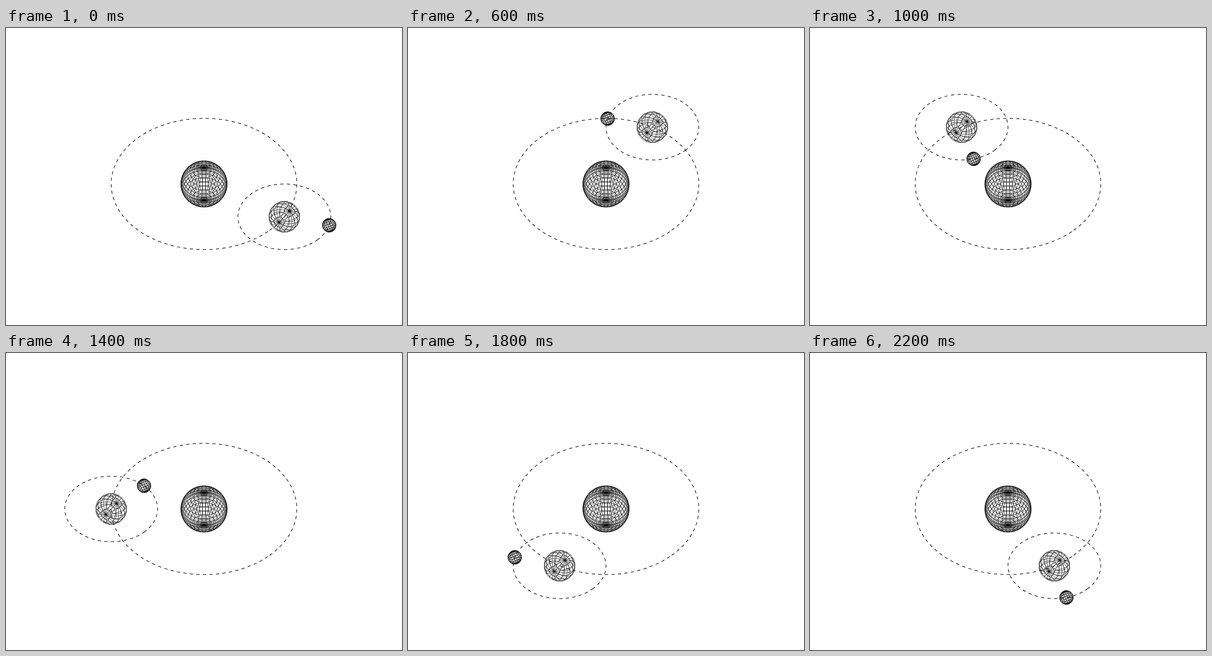
Animation of 864x648 px, one loop 2.3 s. Source, as an HTML page:

```html
<!DOCTYPE html>
<html lang="en">
<head>
<meta charset="utf-8">
<title>Orbits</title>
<style>
  html, body { margin: 0; width: 100%; height: 100%; overflow: hidden; background: #fff; }
  svg { display: block; width: 864px; height: 648px; }
  path { fill: none; stroke: #000; }
  .mesh { stroke-width: .8; }
  .orbit { stroke-width: 1.25; stroke-dasharray: 7.117; }
</style>
</head>
<body>
<svg viewBox="0 0 864 648">
  <g transform="translate(432 340.3)">
    <path id="planetOrbit" class="orbit"/>
    <path id="sun" class="mesh"/>
    <g id="planetSystem">
      <path id="moonOrbit" class="orbit"/>
      <path id="planet" class="mesh"/>
      <path id="moon" class="mesh"/>
    </g>
  </g>
</svg>
<script>
const UNIT = 67.49;
const STEP_MS = 100;
const STEPS = 23;
const PLANET_ORBIT = 3 * UNIT;
const MOON_ORBIT = 1.5 * UNIT;
const H = Math.SQRT1_2;

const rad = deg => deg * Math.PI / 180;
const get = id => document.getElementById(id);

// Orthographic view, 45° above the orbital plane and 45° round the z axis.
const project = ([x, y, z]) => [H * (x + y), (x - y) / 2 - H * z];

const onOrbit = (radius, deg) =>
  project([radius * Math.cos(rad(deg)), radius * Math.sin(rad(deg)), 0]);

function orbitPath(radius) {
  const start = onOrbit(radius, 0), half = onOrbit(radius, 180);
  const arc = end => `A${radius} ${radius * H} 0 0 0 ${end}`;
  return `M${start}${arc(half)}${arc(start)}`;
}

// Wire sphere whose axis leans by `tilt` degrees towards the x axis.
function spherePath(radius, step, tilt) {
  const c = Math.cos(rad(tilt)), s = Math.sin(rad(tilt));
  const point = (lat, lon) => {
    const ring = radius * Math.cos(rad(lat));
    const x = ring * Math.cos(rad(lon));
    const y = ring * Math.sin(rad(lon));
    const z = radius * Math.sin(rad(lat));
    return project([x * c + z * s, y, z * c - x * s]).map(v => v.toFixed(2));
  };
  const loop = at => {
    const points = [];
    for (let a = 0; a < 360; a += 4) points.push(at(a));
    return `M${points.join("L")}Z`;
  };
  let d = "";
  for (let lon = 0; lon < 180; lon += step) d += loop(a => point(a, lon));
  for (let lat = step - 90; lat < 90; lat += step) d += loop(a => point(lat, a));
  return d;
}

function place(id, [x, y]) {
  get(id).setAttribute("transform", `translate(${x} ${y})`);
}

function draw(time) {
  const step = Math.floor(time / STEP_MS) % STEPS + 1;
  place("planetSystem", onOrbit(PLANET_ORBIT, 15 * step));
  place("moon", onOrbit(MOON_ORBIT, 30 * step));
}

const shapes = {
  planetOrbit: orbitPath(PLANET_ORBIT),
  moonOrbit: orbitPath(MOON_ORBIT),
  sun: spherePath(.75 * UNIT, 10, 0),
  planet: spherePath(.5 * UNIT, 20, 30),
  moon: spherePath(.222 * UNIT, 20, -30)
};
for (const id in shapes) get(id).setAttribute("d", shapes[id]);

function tick() {
  draw(performance.now());
  requestAnimationFrame(tick);
}
tick();
</script>
</body>
</html>
```
